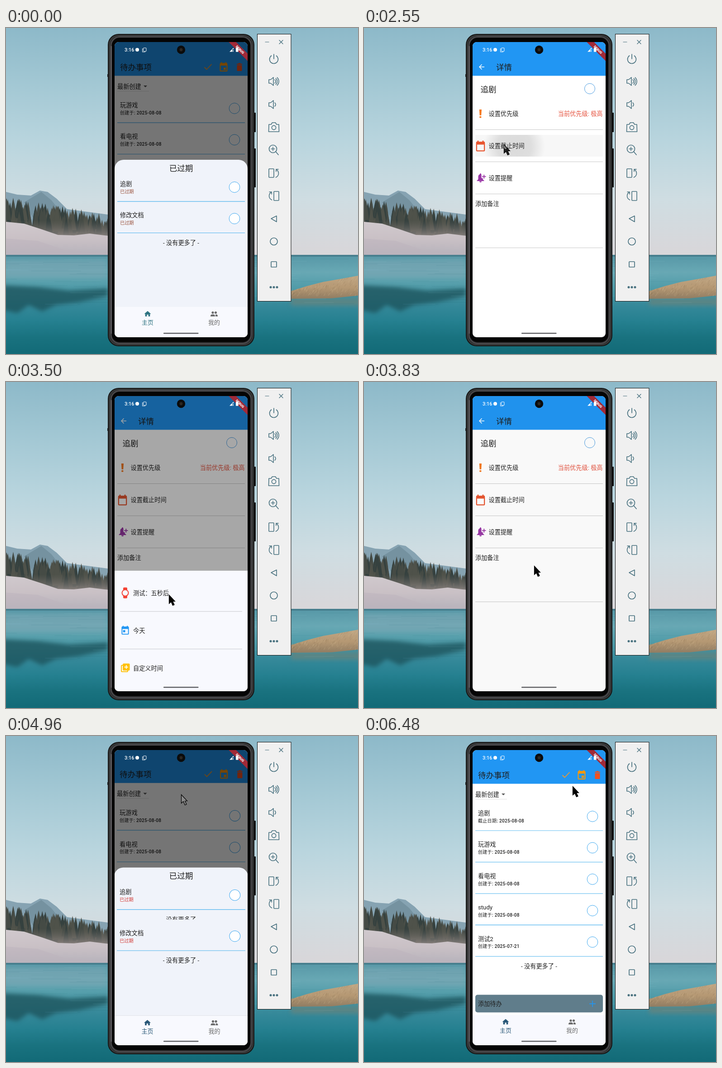
An HTML page with a canvas that plays this animation: 778x720 px, repeating every 8 s.

```html
<!DOCTYPE html>
<html lang="zh-CN">
<head>
<meta charset="utf-8">
<style>
html, body { margin: 0; width: 100%; height: 100%; overflow: hidden; }
canvas { display: block; }
</style>
</head>
<body>
<canvas id="stage" width="778" height="720"></canvas>
<script>
const stage = document.getElementById('stage');
const main = stage.getContext('2d');
let c = main;

const LOOP = 8000, ROW = 69.4, NAV_TOP = 616;
const FONT = "Roboto, 'Noto Sans CJK SC', 'Noto Sans CJK JP', 'Noto Sans CJK', sans-serif";
const INK = '#1f1f1f', BLUE = '#2196f3', LINE = '#4fb3ee';

const clamp = (v, a = 0, b = 1) => Math.min(b, Math.max(a, v));
const mix = (a, b, k) => a + (b - a) * k;

function bezier(x1, y1, x2, y2) {
  const at = (a, b, s) => 3 * a * s * (1 - s) ** 2 + 3 * b * s * s * (1 - s) + s ** 3;
  return x => {
    let lo = 0, hi = 1;
    for (let i = 0; i < 24; i++) {
      const s = (lo + hi) / 2;
      if (at(x1, x2, s) < x) lo = s; else hi = s;
    }
    return at(y1, y2, lo);
  };
}
const ease = bezier(.25, .1, .25, 1);
const decelerate = bezier(0, 0, .2, 1);
const fastOutSlowIn = bezier(.4, 0, .2, 1);

// ---------- drawing helpers ----------
function rect(x, y, w, h, color, r = 0) {
  c.fillStyle = color;
  c.beginPath();
  c.roundRect(x, y, w, h, r);
  c.fill();
}
function poly(color, ...p) {
  c.fillStyle = color;
  c.beginPath();
  for (let i = 0; i < p.length; i += 2) c.lineTo(p[i], p[i + 1]);
  c.closePath();
  c.fill();
}
function line(color, width, ...p) {
  c.strokeStyle = color;
  c.lineWidth = width;
  c.beginPath();
  for (let i = 0; i < p.length; i += 2) c.lineTo(p[i], p[i + 1]);
  c.stroke();
}
function arc(x, y, r, color, width = 1, a = 0, b = 7) {
  c.strokeStyle = color;
  c.lineWidth = width;
  c.beginPath();
  c.arc(x, y, r, a, b);
  c.stroke();
}
function disc(x, y, r, color) {
  c.fillStyle = color;
  c.beginPath();
  c.arc(x, y, r, 0, 7);
  c.fill();
}
function frame(x, y, w, h, color, width, r = 1) {
  c.strokeStyle = color;
  c.lineWidth = width;
  c.beginPath();
  c.roundRect(x, y, w, h, r);
  c.stroke();
}
function text(s, x, midY, size, color = INK, align = 'left', weight = 400, spacing = 0) {
  c.font = `${weight} ${size}px ${FONT}`;
  c.letterSpacing = spacing + 'px';
  c.textAlign = align;
  c.fillStyle = color;
  c.fillText(s, x, midY + size * .375);
}
function gradient(y0, y1, ...stops) {
  const g = c.createLinearGradient(0, y0, 0, y1);
  stops.forEach((s, i) => g.addColorStop(i / (stops.length - 1), s));
  return g;
}
function clipped(x, y, w, h, draw, r = 0) {
  c.save();
  c.beginPath();
  c.roundRect(x, y, w, h, r);
  c.clip();
  draw();
  c.restore();
}

// ---------- desktop, phone and toolbar ----------
function randomizer(seed) {
  return () => (seed = (seed * 16807) % 2147483647) / 2147483647;
}

function landscape() {
  const rnd = randomizer(77);
  rect(0, 0, 778, 505, gradient(0, 505, '#8db9c9', '#a3c8d4', '#b9d5de', '#cfdde2', '#d9d6d9'));
  poly('#86a3b2', 0, 362, 25, 368, 55, 370, 75, 359, 92, 362, 112, 377, 135, 400, 225, 412, 225, 470, 0, 470);
  poly('#7592a0', 40, 385, 78, 362, 100, 380, 120, 405, 60, 420);
  for (let i = 0; i < 150; i++) {
    const x = rnd() * 228, top = 372 + x * .17 + rnd() * 30;
    const foot = Math.min(458, top + 32 + rnd() * 24);
    const color = ['#35413f', '#454b45', '#4f524a'][i % 3];
    poly(color, x, top, x + 3, top + 14, x + 7, foot, x - 7, foot, x - 3, top + 14);
  }
  rect(0, 425, 226, 40, gradient(425, 465, '#6f6a6600', '#948b88'));
  poly(gradient(428, 505, '#d0c9cd', '#c9c0c5', '#b4b1ba'),
    0, 428, 40, 432, 80, 445, 115, 457, 150, 458, 185, 454, 225, 459, 225, 505, 0, 505);
  poly('#bdb5bd88', 0, 465, 70, 470, 130, 490, 225, 496, 225, 502, 0, 502);

  rect(0, 503, 778, 217, gradient(503, 720, '#5798a7', '#68a8b4', '#4f9ba8', '#36899a', '#258090', '#19727f', '#126a77'));
  rect(0, 501, 778, 4, '#477f8e');
  c.save();
  c.filter = 'blur(5px)';
  rect(0, 512, 222, 40, '#7ba6b299');
  poly('#1d545dcc', -10, 568, 70, 572, 140, 580, 225, 575, 225, 592, 160, 606, 110, 612, 80, 626, 50, 612, 25, 630, -10, 622);
  rect(630, 597, 160, 16, '#5b8584');
  c.restore();
  for (let i = 0; i < 90; i++) {
    const y = 508 + rnd() * 105;
    rect(rnd() * 778 - 40, y, 30 + rnd() * 90, 1, i % 2 ? '#9cc8d01f' : '#1f65721f');
  }
  poly(gradient(547, 600, '#c0a683', '#b59873', '#8d7a61'),
    630, 581, 665, 570, 700, 561, 740, 554, 778, 547, 778, 591, 720, 597, 630, 598);
  for (let i = 0; i < 170; i++) {
    const x = 630 + rnd() * 148, low = 582 - (x - 630) * .22;
    const y = mix(low, 593, rnd());
    line(i % 2 ? '#8d765855' : '#d6bd9655', 1, x, y, x + 3, y - 5);
  }
}

function phoneBody() {
  rect(547, 187, 5, 43, '#0d0d0d', 1);
  rect(547, 266, 5, 86, '#0d0d0d', 1);
  rect(224, 102, 3, 6, '#222');
  rect(225, 13, 324, 690, '#161616', 24);
  frame(228.5, 16.5, 317, 683, '#383939', 3, 21);
  frame(232, 19.5, 310, 677, '#49484b', 3, 19);
  rect(231, 40, 3, 635, '#5d5b60');
  rect(234, 22, 306, 671, '#050505', 17);
}

function toolbar() {
  const k = '#48717f', x = 592;
  rect(555, 13, 75.5, 591, '#101010');
  rect(556, 14, 73.5, 589, '#f0f0f0');
  c.lineCap = c.lineJoin = 'round';
  line(k, 1.2, 573, 31, 581, 31);
  line(k, 1.4, 604, 27, 612, 35);
  line(k, 1.4, 612, 27, 604, 35);

  arc(x, 69, 9.5, k, 1.7, -.95, 4.1);
  line(k, 1.7, x, 58, x, 68);

  const speaker = y => {
    line(k, 1.6, 581, y - 4, 585, y - 4, 591, y - 9, 591, y + 9, 585, y + 4, 581, y + 4, 581, y - 4);
    arc(591, y, 5, k, 1.6, -.9, .9);
  };
  speaker(118);
  arc(591, 118, 8.5, k, 1.6, -.9, .9);
  arc(591, 118, 12, k, 1.6, -.8, .8);
  speaker(169);

  line(k, 1.6, 581, 213, 586, 213, 588.5, 209, 595.5, 209, 598, 213, 603, 213, 603.5, 229, 580.5, 229, 581, 213);
  arc(x, 220, 4.6, k, 1.6);

  arc(590, 267, 8.5, k, 1.7);
  line(k, 1.7, 596, 273, 602, 280);
  line(k, 1.5, 586, 267, 594, 267);
  line(k, 1.5, 590, 263, 590, 271);

  frame(581, 311, 11, 19, k, 1.6);
  arc(593, 321, 9.5, k, 1.6, -1, 1.2);
  line(k, 1.6, 602, 312, 597, 312, 597, 317);
  frame(592, 361, 11, 20, k, 1.6);
  arc(591, 371, 9.5, k, 1.6, 1.95, 4.1);
  line(k, 1.6, 582, 362, 587, 362, 587, 367);

  line(k, 1.6, 598, 415, 586, 421, 598, 428, 598, 415);
  arc(x, 471.5, 8, k, 1.7);
  frame(586, 516, 12, 12, k, 1.7);
  for (const dx of [-7, 0, 7]) disc(x + dx, 572.5, 2.5, k);
  c.lineCap = 'butt';
  c.lineJoin = 'miter';
}

// ---------- app widgets ----------
function calendar(x, y, s, color, block) {
  c.save();
  c.translate(x, y);
  c.scale(s, s);
  frame(-7.5, -8, 15, 16.5, color, 2, 1);
  rect(-8, -9, 16, 5.5, color);
  rect(-6, -11, 2.4, 4, color);
  rect(3.6, -11, 2.4, 4, color);
  if (block) rect(block < 0 ? -5 : 0, block < 0 ? -1 : 1, 5, 5, color);
  c.restore();
}

function appBar() {
  rect(240, 31, 294, 74.5, BLUE);
}

function taskRow(y, title, sub, overdue, fill) {
  text(title, 252, y, 13.2);
  if (overdue) text(sub, 252, y + 17, 10.2, overdue);
  else text(sub, 252, y + 17, 10, INK, 'left', 500, .3);
  if (fill) disc(505, y + 7.5, 11.5, fill);
  arc(505, y + 7.5, 11.8, '#3fa9f0');
  rect(246, y + 38.6, 282, 1.1, LINE);
}
const footer = y => text('- 没有更多了 -', 387, y, 13.2, INK, 'center');

function navBar(active) {
  rect(240, NAV_TOP, 294, 67, '#f8f9fe');
  poly(active, 313, 625, 320.5, 631.5, 318.3, 631.5, 318.3, 637, 314.7, 637, 314.7, 633, 311.3, 633, 311.3, 637, 307.7, 637, 307.7, 631.5, 305.5, 631.5);
  text('主页', 313, 650.5, 13, active, 'center');
  const gray = '#6c6c6c';
  disc(457, 628.5, 2.6, gray);
  disc(463.5, 628.5, 2.6, gray);
  rect(452, 632.5, 10, 4.5, gray, [4, 4, 0, 0]);
  rect(463, 632.5, 5, 4.5, gray, [1, 4, 0, 0]);
  text('我的', 460, 650.5, 13, gray, 'center');
}

function homePage(T) {
  const revisit = T >= 4960;
  const inserted = revisit ? clamp((T - 4960) / 270) : 0;
  const open = clamp(T < 5710 ? 1 : .5 - (T - 5710) / 200);
  rect(240, 31, 294, 652, '#fff');
  appBar();
  text('待办事项', 252, 86, 17.5);
  line('#f0982e', 1.8, 438.5, 86.5, 443.5, 91.5, 454.5, 80);
  calendar(481, 86.5, 1, '#ff9800', 1);
  rect(510, 79, 12, 2, '#f4511e');
  rect(513.5, 77.5, 5, 2, '#f4511e');
  rect(510.5, 82, 11, 13, '#f4511e', 1.5);

  text('最新创建', 246, 129, 13.2);
  poly('#555', 304, 127, 312, 127, 308, 131);
  rect(246, 139, 70, .8, '#d8d8d8');

  const tasks = [['玩游戏', '创建于: 2025-08-08'], ['看电视', '创建于: 2025-08-08'],
    ['study', '创建于: 2025-08-08'], ['测试2', '创建于: 2025-07-21']];
  if (inserted) clipped(240, 140, 294, ROW * inserted, () => taskRow(170, '追剧', '截止日期: 2025-08-08'));
  const first = 170 + ROW * inserted;
  tasks.forEach(([title, sub], i) => taskRow(first + ROW * i, title, sub));
  footer(first + ROW * 4 - 8.8);

  rect(246, 571.5, 282, 39, '#607d8b', 5);
  text('添加待办', 252, 591.5, 13.2);
  rect(498, 590.6, 14, 1.6, BLUE);
  rect(504.2, 584.5, 1.6, 14, BLUE);

  if (open > 0) {
    rect(240, 31, 294, 585, `rgba(0,0,0,${.54 * ease(open)})`);
    const top = 291 + 325 * (1 - decelerate(open));
    clipped(240, 31, 294, 585, () => expiredSheet(T, top, revisit));
  }
  navBar(revisit ? '#2a5878' : '#2f7482');
}

function expiredSheet(T, top, revisit) {
  const red = revisit ? '#d23b36' : '#9a523c';
  const y = top + 53;
  rect(240, top, 294, 340, '#f0f3fa', [20, 20, 0, 0]);
  text('已过期', 387, top + 18, 17.5, INK, 'center');
  const block = revisit ? clamp(90 - (T - 4960) * .33, 0, 90) : ROW;
  clipped(240, y - 30, 294, block + 1, () => {
    taskRow(y, '追剧', '已过期', red, '#fff');
    if (revisit) footer(y + 60.5);
  });
  taskRow(y + block, '修改文档', '已过期', red, '#fff');
  footer(y + block + 60.3);
}

function detailPage(T) {
  rect(240, 31, 294, 652, '#fff');
  appBar();
  line('#fff', 1.5, 266, 86, 255.5, 86);
  line('#fff', 1.5, 260.5, 80.5, 255, 86, 260.5, 91.5);
  text('详情', 292, 86.5, 17.5);
  text('追剧', 257.5, 135, 17.5);
  arc(499, 134, 11.5, '#4a9be0');

  if (T >= 2420 && T < 2760) {
    clipped(246, 236, 282, 48, () => {
      const r = mix(30, 68, clamp((T - 2420) / 130));
      const g = c.createRadialGradient(332, 262, 0, 332, 262, r);
      g.addColorStop(0, '#dadada');
      g.addColorStop(.55, '#dedede');
      g.addColorStop(1, '#f7f7f7');
      rect(246, 236, 282, 48, '#f7f7f7');
      rect(246, 236, 282, 48, g);
    });
  }

  poly('#f5791f', 254.8, 180, 260, 180, 259.2, 193, 255.6, 193);
  rect(255.2, 195, 4.2, 3.6, '#f5791f', 1);
  text('设置优先级', 275.5, 189.5, 13.2);
  text('当前优先级: 极高', 527.5, 189.5, 13.2, '#e5503c', 'right');
  calendar(257.5, 261.5, 1.15, '#e8552f');
  text('设置截止时间', 275.5, 260.5, 13.2);

  const purple = '#9a37a6';
  rect(252.5, 323, 10, 14, purple, [5, 5, 0, 0]);
  poly(purple, 249, 338, 252.5, 334, 262.5, 334, 266, 338);
  rect(256, 321, 3, 4, purple, 1.5);
  rect(255, 338.5, 5, 2.5, purple, [0, 0, 2.5, 2.5]);
  rect(259.5, 321.5, 10.5, 10, '#fff');
  rect(261, 327.3, 8.5, 1.8, purple);
  rect(264.4, 324, 1.8, 8.5, purple);
  text('设置提醒', 275.5, 331.5, 13.2);
  text('添加备注', 246, 388, 13.2);
  for (const y of [224, 295, 366, 485]) rect(246, y, 282, 1, '#c9c9c9');

  const open = clamp(T < 3240 ? (T - 2590) / 250 : .37 - (T - 3500) / 200);
  if (open > 0) {
    rect(240, 31, 294, 652, `rgba(0,0,0,${.54 * ease(open)})`);
    dateSheet(683 - 367 * decelerate(open));
  } else if (T > 3500) {
    rect(240, 31, 294, 652, 'rgba(0,0,0,.024)');
  }
}

function dateSheet(top) {
  rect(240, top, 294, 370, '#f8f9fe');
  const x = 263.5, [a, b, d] = [49, 132, 215].map(dy => top + dy);
  rect(x - 4.5, a - 12, 9, 24, '#f44336', 2);
  disc(x, a, 8, '#f44336');
  disc(x, a, 6, '#f8f9fe');
  calendar(x, b, .95, BLUE, -1);
  frame(x - 8.5, d - 6, 14, 14, '#ffc107', 2, 1);
  rect(x - 5.5, d - 10, 15.5, 15.5, '#ffc107', 2);
  rect(x - 2, d - 3.2, 8.5, 1.8, '#fff');
  rect(x + 1.4, d - 6.5, 1.8, 8.5, '#fff');
  text('测试：五秒后', 281, a, 13.2);
  text('今天', 281, b, 13.2);
  text('自定义时间', 281, d, 13.2);
  rect(252, top + 89.5, 270, 1, '#c6c8cc');
  rect(252, top + 172.5, 270, 1, '#c6c8cc');
}

function systemOverlay() {
  // debug ribbon
  c.save();
  c.translate(517, 48);
  c.rotate(Math.PI / 4);
  rect(-32, -6, 64, 11.5, '#a12a38');
  text('DEBUG', 0, -.3, 7.2, '#fff', 'center', 900);
  c.restore();

  text('3:16', 262, 48, 10.8, '#fff', 'left', 500);
  disc(290, 48, 4, '#fff');
  frame(303.5, 44, 6.5, 7.5, '#fff', 1);
  line('#fff', .9, 301.5, 45, 301.5, 53, 308, 53);
  poly('#fff', 494, 52.5, 503, 43.5, 503, 47, 500, 47, 500, 52.5);
  rect(501, 48.5, 1.5, 4, '#fff');
  rect(508, 44, 5.5, 8.8, '#fff', .8);
  rect(509.5, 42.8, 2.5, 2, '#fff');
  disc(387, 48, 9.2, '#0b0b0b');
  disc(387, 48, 3.4, '#2b2622');
  rect(348, 673, 77.5, 2.6, '#626366', 1.3);
}

function scaled(s, draw, alpha = 1) {
  c.save();
  c.globalAlpha = alpha;
  c.translate(387, 357);
  c.scale(s, s);
  c.translate(-387, -357);
  draw();
  c.restore();
}

function screen(T) {
  if (T < 1790) homePage(T);
  else if (T < 4960) {
    const v = clamp((T - 1760) / 300), k = fastOutSlowIn(v);
    if (v < 1) {
      scaled(mix(1, 1.05, k), () => homePage(T));
      rect(240, 31, 294, 652, `rgba(0,0,0,${.6 * clamp(v * 2)})`);
    }
    scaled(mix(.85, 1, k), () => detailPage(T), clamp((v - .075) / .175));
  } else scaled(T < 5020 ? 1.007 : 1, () => homePage(T));
  systemOverlay();
}

// ---------- pointer ----------
const path = [
  [660, 679, 682], [800, 545, 575], [1000, 350, 425], [1264, 263, 345],
  [1950, 263, 345], [2270, 309, 257], [2690, 309, 257], [3100, 360, 470],
  [3500, 360, 470], [3700, 375, 430], [3960, 380, 344], [4030, 346, 265],
  [4300, 266, 115], [4570, 250, 80], [4959, 250, 80], [4960, 387, 129],
  [5230, 430, 150], [6060, 430, 150], [6480, 461, 111]
];
const clicks = [[1460, 263, 345.5], [2420, 309, 257], [3308, 360, 470], [4644, 250, 80]];

function pointer(T) {
  if (T < path[0][0]) return;
  const next = path.findIndex(p => p[0] > T);
  let [, x, y] = path[path.length - 1];
  if (next > 0) {
    const [t0, x0, y0] = path[next - 1], [t1, x1, y1] = path[next];
    const k = (T - t0) / (t1 - t0);
    x = mix(x0, x1, k);
    y = mix(y0, y1, k);
  }
  for (const [at, cx, cy] of clicks) {
    if (T >= at - 1 && T < at + 60) disc(cx, cy, 13.5, 'rgba(255,255,0,.47)');
  }
  // The arrow inverts what lies beneath it.
  c.save();
  c.translate(Math.round(x) + .5, Math.round(y) + .5);
  c.globalCompositeOperation = 'difference';
  poly('#fff', 0, 0, 0, 19, 4.5, 15, 8, 23, 11.5, 21.5, 8, 14, 13, 14);
  c.globalCompositeOperation = 'source-over';
  c.strokeStyle = '#000';
  c.lineWidth = 1.2;
  c.stroke();
  c.restore();
}

// ---------- clock ----------
const anchors = [0, 660, 1460, 1790, 2420, 2550, 3240, 3500, 3960, 4030, 4100, 4960, 5710, 5780, 5860, 6130, 6480];
const STEP = 68;
function stepped(t) {
  const a = anchors.filter(v => v <= t).pop();
  return a + Math.floor((t - a) / STEP) * STEP;
}

const backdrop = document.createElement('canvas');
backdrop.width = 778;
backdrop.height = 720;
c = backdrop.getContext('2d');
landscape();
phoneBody();
toolbar();
c = main;

function draw(now) {
  const T = stepped(now % LOOP);
  c.drawImage(backdrop, 0, 0);
  clipped(240, 31, 294, 652, () => screen(T), 9);
  pointer(T);
  requestAnimationFrame(draw);
}
requestAnimationFrame(draw);
</script>
</body>
</html>
```
